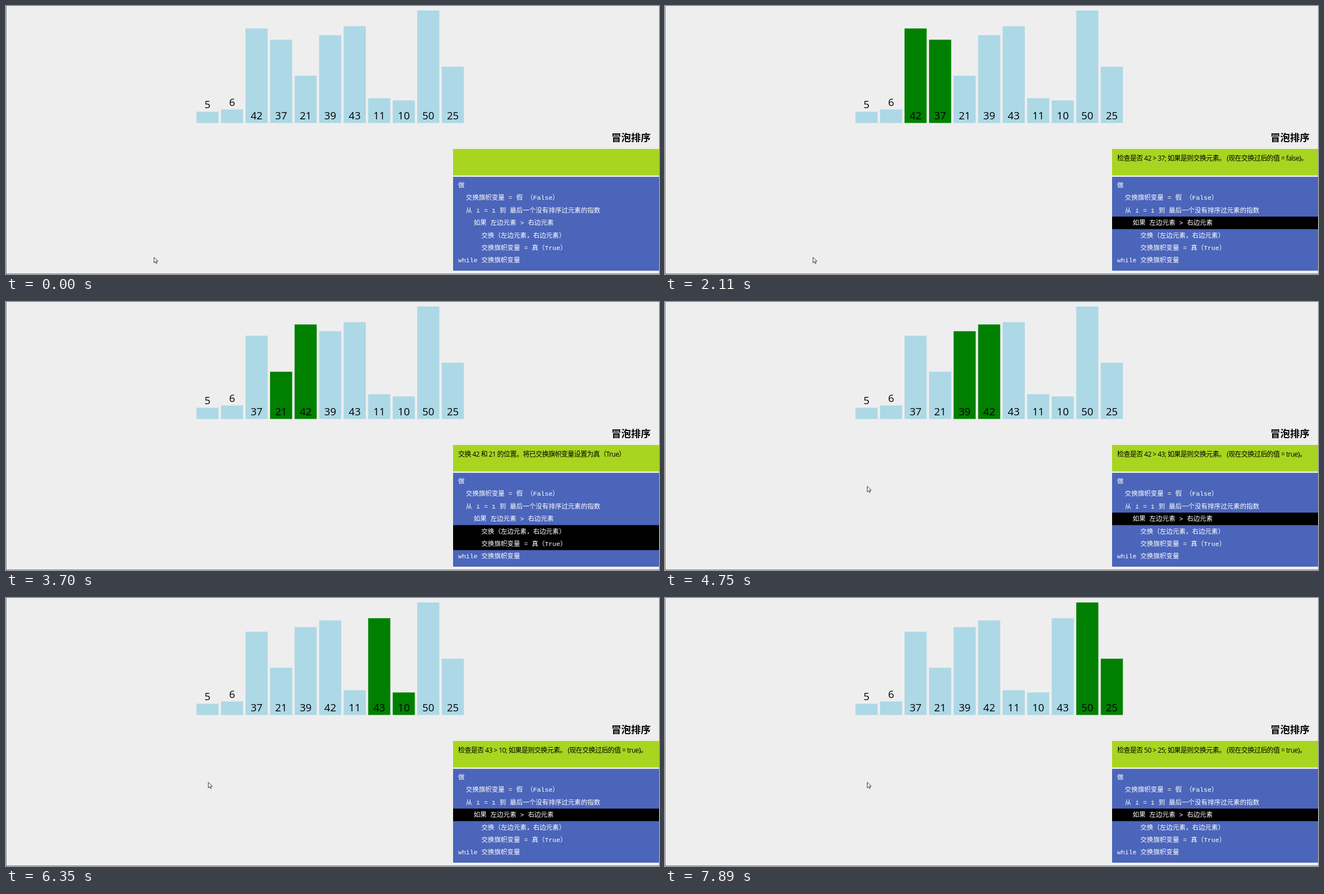
Animation, 1167 px wide and 480 px high, one loop 8 s. Source, as an HTML page:

```html
<!DOCTYPE html>
<html lang="zh-CN">
<head>
<meta charset="utf-8">
<title>冒泡排序</title>
<style>
  html, body { margin: 0; width: 100%; height: 100%; overflow: hidden; background: #eee; }
  svg { display: block; width: 1167px; height: 480px; }
  text { white-space: pre; }
  .label { font: 18.6px "Open Sans", "Noto Sans", sans-serif; text-anchor: middle; }
  .title { font: bold 17.5px "Noto Sans CJK SC", "Noto Sans CJK", sans-serif; }
  .message { font: 12px "Open Sans", "Noto Sans CJK SC", "Noto Sans CJK", sans-serif; letter-spacing: -.55px; }
  .code { font: 11.55px "Liberation Mono", "Noto Sans CJK SC", "Noto Sans CJK", monospace; fill: #fff; }
</style>
</head>
<body>
<svg viewBox="0 0 1167 480">
  <rect width="1167" height="480" fill="#eee"/>
  <g id="bars"></g>
  <text class="title" x="1082" y="242">冒泡排序</text>
  <rect x="799" y="256" width="368" height="47.5" fill="#a7d520"/>
  <text id="message" class="message" x="808" y="277"></text>
  <rect x="799" y="306" width="368" height="168" fill="#4b65ba"/>
  <rect id="marker" x="799" width="368"/>
  <g id="code"></g>
  <path d="M.5 0V480M0 479.5H1167" stroke="#888"/>
  <path id="cursor" d="M0 0V10L2.4 7.8 4 11.4 5.5 10.7 4 7.3H7.2Z" fill="#fff" stroke="#222" stroke-width=".9"/>
</svg>
<script>
const LOOP = 8000, ROW = 22.4, CODE_TOP = 310, PITCH = 43.84, FLOOR = 209.5;
const values = [5, 6, 42, 37, 21, 39, 43, 11, 10, 50, 25];
const codeLines = [
  '做',
  '  交换旗帜变量 = 假 （False）',
  '  从 i = 1 到 最后一个没有排序过元素的指数',
  '    如果 左边元素 > 右边元素',
  '      交换（左边元素，右边元素）',
  '      交换旗帜变量 = 真（True）',
  'while 交换旗帜变量'
];

// Screen refresh times of each comparison or swap, in order
const refreshes = [
  [830, 980, 1130], [1410, 1560], [1840, 1980, 2110], [2390, 2540], [2850, 3000],
  [3280, 3400, 3550], [3820, 3950], [4360, 4490, 4620], [4750, 4870, 5020],
  [5300, 5420], [5690, 5830, 5960], [6230, 6350], [6750, 6890, 7030],
  [7180, 7320], [7740, 7890]
];

// Time, x, y; the pointer leaves the bottom edge for a moment
const pointerPath = [
  [0, 264, 450], [3400, 276, 468], [3550, 280, 490],
  [3820, 280, 472], [3950, 265, 433], [4080, 266, 329], [4210, 361, 330]
];

const byId = id => document.getElementById(id);
function add(parent, tag, attrs, text = '') {
  const node = document.createElementNS('http://www.w3.org/2000/svg', tag);
  for (const key in attrs) node.setAttribute(key, attrs[key]);
  node.textContent = text;
  return parent.appendChild(node);
}
const mix = (a, b, p) => a + (b - a) * p;
const latest = (list, t, time) => list.findLast(item => time(item) <= t);

function buildSteps() {
  const steps = [
    { times: [0], message: '', rows: [0, 0], lit: [], order: values },
    { times: [430], message: '将交换旗帜变量设置为假（False）。从 1 到 10 重复之前的步骤。',
      rows: [1, 2], lit: [], order: values }
  ];
  let order = values, swapped = false, next = 0;
  const push = step => {
    if (next < refreshes.length) steps.push({ times: refreshes[next++], order, ...step });
  };
  for (let i = 0; i < values.length - 1; i++) {
    const a = order[i], b = order[i + 1], lit = [a, b];
    push({ lit, rows: [3, 1],
      message: `检查是否 ${a} > ${b}; 如果是则交换元素。 (现在交换过后的值 = ${swapped})。` });
    if (a <= b) continue;
    order = order.with(i, b).with(i + 1, a);
    swapped = true;
    push({ lit, rows: [4, 2],
      message: `交换 ${a} 和 ${b} 的位置。将已交换旗帜变量设置为真（True）` });
  }
  return steps;
}

const steps = buildSteps();
const bars = values.map(value => {
  const height = value * 4.03;
  const group = add(byId('bars'), 'g', {});
  const rect = add(group, 'rect', { y: FLOOR - height, width: 39.5, height });
  add(group, 'text', { class: 'label', x: 19.8, y: value < 10 ? FLOOR - height - 6.3 : 203 }, value);
  return { value, group, rect };
});
codeLines.forEach((line, i) =>
  add(byId('code'), 'text', { class: 'code', x: 808, y: CODE_TOP + ROW * i + 15 }, line));

function progressAt({ times }, t) {
  const seen = times.filter(time => time <= t).length;
  if (seen === times.length) return 1;
  return times.length === 2 ? .25 : (seen - 1) / 2;
}

function draw(t) {
  const step = latest(steps, t, s => s.times[0]);
  const before = steps[Math.max(0, steps.indexOf(step) - 1)];
  const p = progressAt(step, t);
  for (const { value, group, rect } of bars) {
    const slot = mix(before.order.indexOf(value), step.order.indexOf(value), p);
    const glow = mix(+before.lit.includes(value), +step.lit.includes(value), p);
    group.setAttribute('transform', `translate(${340.4 + slot * PITCH})`);
    rect.setAttribute('fill', `rgb(${mix(173, 0, glow)},${mix(216, 128, glow)},${mix(230, 0, glow)})`);
  }
  const message = byId('message');
  if (message.textContent !== step.message) message.textContent = step.message;
  byId('marker').setAttribute('y', CODE_TOP + ROW * step.rows[0]);
  byId('marker').setAttribute('height', ROW * step.rows[1]);
  const [, x, y] = latest(pointerPath, t, point => point[0]);
  byId('cursor').setAttribute('transform', `translate(${x + .5} ${y})`);
}

const start = performance.now();
function tick() {
  draw((performance.now() - start) % LOOP);
  requestAnimationFrame(tick);
}
tick();
</script>
</body>
</html>
```
